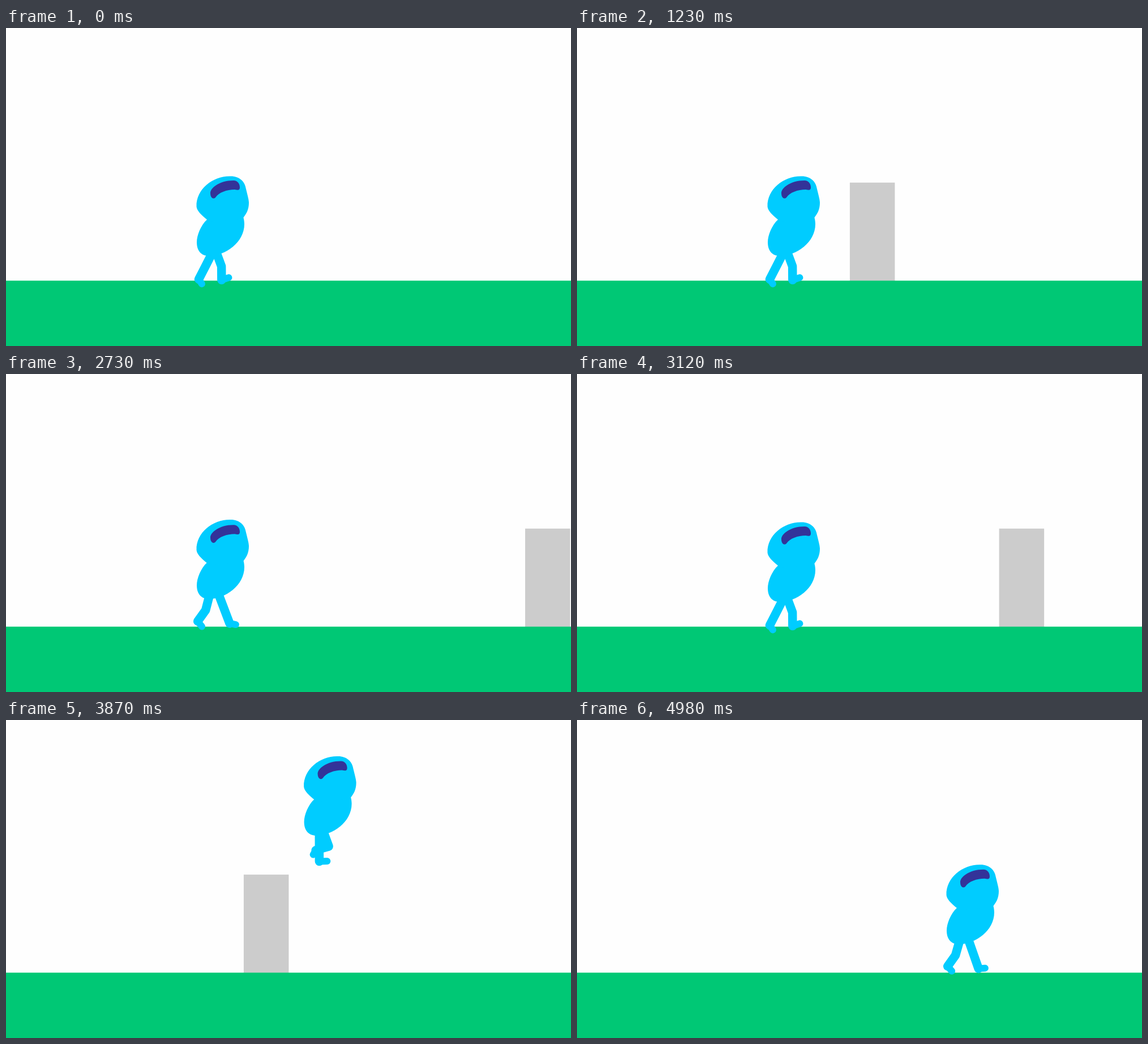
Recreate the animation shown at these times as an HTML page with a canvas. Size 998 by 561 pixels, loop 5.01 s.

```html
<!DOCTYPE html>
<html lang="en">
<head>
<meta charset="utf-8">
<title>Walk, trip, jump</title>
<style>
  html, body { margin: 0; width: 100%; height: 100%; overflow: hidden; background: #fefefe; }
  canvas { display: block; }
</style>
</head>
<body>
<canvas id="stage" width="998" height="561"></canvas>
<script>
const ctx = document.getElementById('stage').getContext('2d');
const LOOP = 5010, TICK = 30, STEP = 300;
const CYAN = '#00ccff', GROUND_Y = 445.7, BONE = 24;

const head = new Path2D('M336.5 315C335.5 284 366 261 396 261.5C412 261 421 271 423 280C425 289 429 302 429 308C429 320 425 328 417 337L360 342L355 338C345 330 337 322 336.5 315Z');
const torso = new Path2D('M355 338C344 348 337 366 337 378C337 392 344 402 358 402C388 402 421 378 421 346C421 338 419 334 418 328Z');
const mouth = new Path2D('M361 292C360 283 376 269 402 269C409 269 413 275 413 281C413 287 409 286 404 285C390 285 376 290 370 299C366 303 361 299 361 292Z');

const clamp = v => Math.max(0, Math.min(1, v));
const progress = (t, from, to) => clamp((t - from) / (to - from));
const mix = (a, b, k) => a + (b - a) * k;
const bump = (v, center, width) => Math.exp(-(((v - center) / width) ** 2));

// Sum of harmonics, each [amplitude, shift]; the base period is two steps.
const wave = (u, mean, ...terms) =>
  terms.reduce((sum, [amp, shift], n) => sum + amp * Math.cos((n + 1) * Math.PI * (u - shift)), mean);

const bobAt = phase => 10 * bump(phase % 1, .52, .2);

function strokeLine(width, ...points) {
  ctx.lineWidth = width;
  ctx.beginPath();
  points.forEach(p => ctx.lineTo(...p));
  ctx.stroke();
}

function drawLeg(phase) {
  const u = phase % 2;
  const hip = [wave(u, 368, [9.5, 1.65]), 398 - bobAt(phase)];
  const ankle = [
    wave(u, 363, [28, -.2], [-4, .15], [3.5, .25]),
    444.5 - 9 * bump(u, .64, .2) - 26 * bump(u, 1.41, .22)
  ];
  // The knee bends forward whenever hip and ankle come closer than two bones.
  const dx = ankle[0] - hip[0], dy = ankle[1] - hip[1];
  const reach = Math.hypot(dx, dy);
  const bend = Math.sqrt(Math.max(0, BONE ** 2 - reach ** 2 / 4)) / reach;
  const knee = [hip[0] + dx / 2 + dy * bend, hip[1] + dy / 2 - dx * bend];

  const tilt = wave(u, 39, [55, 1.15], [25, .4], [12, 0]) * Math.PI / 180;
  const foot = wave(u, 11.5, [2.5, .25]);
  const toe = [ankle[0] + foot * Math.cos(tilt), ankle[1] + foot * Math.sin(tilt)];

  strokeLine(15.5, hip, knee, ankle);
  strokeLine(12, ankle, toe);
}

function fillShifted(path, color, dy) {
  ctx.save();
  ctx.translate(0, dy);
  ctx.fillStyle = color;
  ctx.fill(path);
  ctx.restore();
}

function drawWalker({ x = 0, y = 0, phase = 0, fall = 0 }) {
  const bob = bobAt(phase), size = mix(1, .89, fall);
  ctx.save();
  ctx.translate(mix(379, 329, fall) + x, mix(367, 421.5, fall) + y);
  ctx.rotate(-98 * fall * Math.PI / 180);
  ctx.scale(size, size);
  ctx.translate(-379, -367);
  ctx.strokeStyle = CYAN;
  ctx.lineCap = ctx.lineJoin = 'round';
  drawLeg(phase + 1);
  drawLeg(phase);
  fillShifted(torso, CYAN, -1.2 * bob);
  fillShifted(head, CYAN, -bob);
  fillShifted(mouth, '#333399', -.6 * bob);
  ctx.restore();
}

function walkerAt(t) {
  const walk = start => Math.max(0, t - start) / STEP;
  if (t < 1350) return { phase: walk(30) };
  if (t < 2490) return { fall: 1 - (1 - progress(t, 1350, 1560)) ** 2 };
  if (t < 3540) return { phase: walk(2520) };
  if (t < 4110) return {
    x: 316 * progress(t, 3510, 4110),
    y: .00102 * (t - 3850) ** 2 - 195,
    phase: .3
  };
  return { x: 316, y: -4, phase: walk(4150) };
}

function blockAt(t) {
  const approach = s => 1022.5 - .4395 * s;
  if (t < 2490) return Math.max(429, approach(t));
  if (t < 3510) return approach(t - 2490);
  if (t < 4080) return mix(574, 330, progress(t, 3510, 4080));
  return 330 - .4705 * (t - 4080);
}

function drawMessage(t) {
  const shown = progress(t, 1410, 1650);
  ctx.globalAlpha = shown * (1 - progress(t, 1650, 1950));
  ctx.font = '74px "Liberation Sans", sans-serif';
  ctx.textAlign = 'center';
  ctx.fillStyle = '#000';
  ctx.fillText('Game Over', 472 + 10 * (1 - shown), 212);
  ctx.globalAlpha = 1;
}

function draw(now) {
  const t = Math.floor(now % LOOP / TICK) * TICK;
  ctx.fillStyle = '#fefefe';
  ctx.fillRect(0, 0, 998, 561);
  ctx.fillStyle = '#cccccc';
  ctx.fillRect(blockAt(t), 272.7, 79.5, 174);
  ctx.fillStyle = '#00c875';
  ctx.fillRect(0, GROUND_Y, 998, 561 - GROUND_Y);
  drawWalker(walkerAt(t));
  drawMessage(t);
}

const start = performance.now();
function loop() {
  draw(performance.now() - start);
  requestAnimationFrame(loop);
}
loop();
</script>
</body>
</html>
```
